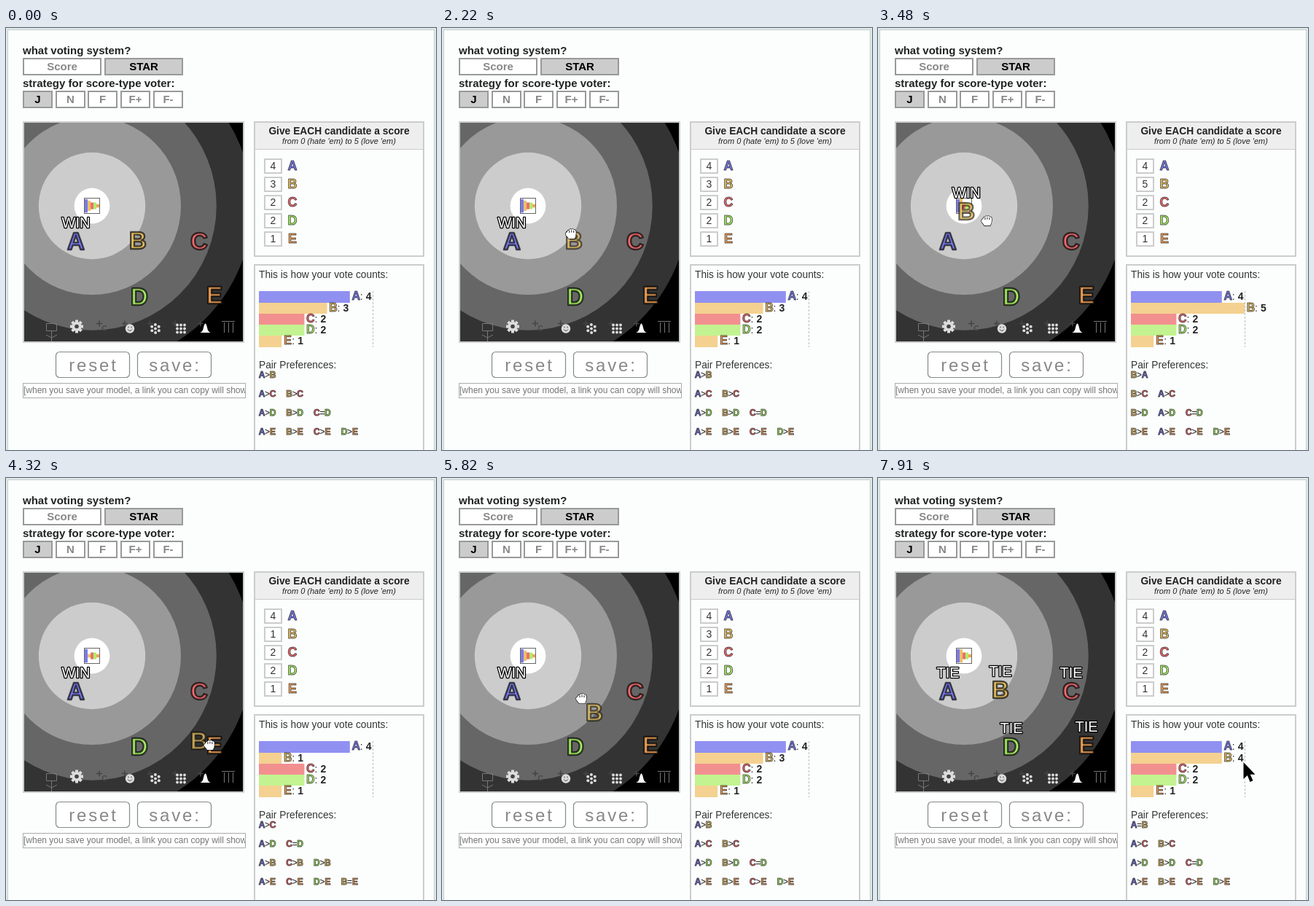
Animation of 590 by 579 pixels, one loop 8 s. Source, as an HTML page with a canvas:

```html
<!DOCTYPE html>
<html lang="en">
<head>
<meta charset="utf-8">
<title>STAR voting sandbox</title>
<style>
html, body { margin: 0; width: 100%; height: 100%; overflow: hidden; background: #e0ebe9; }
canvas { display: block; }
</style>
</head>
<body>
<canvas id="stage" width="590" height="579"></canvas>
<script>
const ctx = document.getElementById('stage').getContext('2d');
const FONT = 'Arial, "Liberation Sans", sans-serif';
const VOTER = { x: 118, y: 244 }, RING = 48.8;
const LOOP = 8000, LAG = 120;
const ENTER = 570, GRAB = 1800, DRAG = 2220, DROP = 6060, RELEASE = 6470;

const candidates = [
  { name: 'A', x: 96, y: 292, color: '#7b7bea', bar: '#9090f1' },
  { name: 'B', x: 181, y: 291, color: '#e8c266', bar: '#f4d190' },
  { name: 'C', x: 265, y: 292, color: '#f06c70', bar: '#f29090' },
  { name: 'D', x: 183, y: 368, color: '#aaf068', bar: '#c2f390' },
  { name: 'E', x: 286, y: 366, color: '#f2a45c', bar: '#f4d190' }
];
const dragged = candidates[1];

// Where the pointer turns or pauses
const path = [
  { t: ENTER, x: 59, y: 542 }, { t: 1110, x: 163, y: 414 }, { t: 1680, x: 183, y: 302 },
  { t: DRAG, x: 177, y: 283 }, { t: 3000, x: 118, y: 246 }, { t: 3360, x: 117, y: 243 },
  { t: 3480, x: 149, y: 265 }, { t: 4320, x: 279, y: 367 }, { t: 4560, x: 303, y: 394 },
  { t: 5100, x: 303, y: 394 }, { t: 5700, x: 205, y: 314 }, { t: DROP, x: 164, y: 282 },
  { t: RELEASE, x: 164, y: 282 }, { t: 6590, x: 298, y: 342 }, { t: 7150, x: 505, y: 384 },
  { t: 7500, x: 491, y: 383 }, { t: 7910, x: 501.5, y: 390 }
];

const clamp = (v, lo, hi) => Math.min(hi, Math.max(lo, v));

function pointerAt(time) {
  const t = clamp(time, ENTER, path.at(-1).t);
  const i = path.findIndex(p => p.t >= t);
  const b = path[i], a = path[i - 1] ?? b;
  const k = a === b ? 0 : (t - a.t) / (b.t - a.t);
  return { x: a.x + (b.x - a.x) * k, y: a.y + (b.y - a.y) * k };
}

const score = c => Math.max(0, 5 - Math.round(Math.hypot(c.x - VOTER.x, c.y - VOTER.y) / RING));

function rect(x, y, w, h, fill) {
  ctx.fillStyle = fill;
  ctx.fillRect(x, y, w, h);
}

function box(x, y, w, h, border, fill, line = 2) {
  rect(x, y, w, h, border);
  rect(x + line, y + line, w - 2 * line, h - 2 * line, fill);
}

function text(str, x, y, style, color = '#333', align = 'left') {
  ctx.font = `${style} ${FONT}`;
  ctx.textAlign = align;
  ctx.fillStyle = color;
  ctx.fillText(str, x, y);
}

function edge(str, x, y, style, color, width) {
  ctx.font = `${style} ${FONT}`;
  ctx.textAlign = 'center';
  ctx.strokeStyle = color;
  ctx.lineWidth = width;
  ctx.strokeText(str, x, y);
}

function letter(c, x, y, size, shade = '#0009', width = 1) {
  const style = `bold ${size}px`;
  text(c.name, x, y, style, c.color, 'center');
  edge(c.name, x, y, style, shade, width);
}

function disc(x, y, r, fill) {
  ctx.fillStyle = fill;
  ctx.beginPath();
  ctx.arc(x, y, r, 0, 2 * Math.PI);
  ctx.fill();
}

function lines(d, color, width = 1) {
  ctx.strokeStyle = color;
  ctx.lineWidth = width;
  ctx.stroke(new Path2D(d));
}

function choice(label, x, y, w, on) {
  box(x, y, w, 24, '#999', on ? '#ccc' : '#fff');
  text(label, x + w / 2, y + 17, 'bold 15px', on ? '#000' : '#888', 'center');
}

function drawControls() {
  rect(0, 0, 590, 579, '#e0ebe9');
  box(2, 2, 586, 590, '#c6cecd', '#fcfefe', 1);
  text('what voting system?', 23, 36, 'bold 15px', '#222');
  choice('Score', 23, 41, 108, false);
  choice('STAR', 135, 41, 108, true);
  text('strategy for score-type voter:', 23, 81, 'bold 15px', '#222');
  ['J', 'N', 'F', 'F+', 'F-'].forEach((s, i) => choice(s, Math.round(23 + 44.7 * i), 86, 41, !i));

  ctx.letterSpacing = '2.8px';
  for (const [label, x] of [['reset', 68], ['save:', 180]]) {
    ctx.beginPath();
    ctx.roundRect(x + .5, 444.5, 101, 35, 5);
    ctx.fillStyle = '#fff';
    ctx.fill();
    ctx.strokeStyle = '#888';
    ctx.lineWidth = 1.2;
    ctx.stroke();
    text(label, x + 52, 471, '24px', '#888', 'center');
  }
  ctx.letterSpacing = '0px';

  box(23, 487, 306, 21, '#aaa', '#fff', 1);
  ctx.save();
  ctx.beginPath();
  ctx.rect(24, 488, 304, 19);
  ctx.clip();
  text('[when you save your model, a link you can copy will show up here]', 24, 501, '12px', '#757575');
  ctx.restore();
}

function drawToolbar() {
  const dim = '#777', light = '#ddd';
  lines('M55.5 405.5h14v10h-14zM62.5 416v14M55 421l7.5 4 7.5-4M296 402.5h18M299.5 404v14M305.5 404v14M311.5 404v14', dim);
  for (let a = 0; a < 2 * Math.PI; a += Math.PI / 4)
    lines(`M97 409.5l${9 * Math.cos(a)} ${9 * Math.sin(a)}`, light, 4);
  disc(97, 409.5, 6.5, light);
  disc(97, 409.5, 2.8, '#444');
  for (let i = 0; i < 5; i++) lines(`M${124 + 34.7 * i} 405.5h8m-4-4v8`, '#444', 1.5);
  text('c', 135, 416, '15px', '#444', 'center');
  disc(170, 412.5, 6.2, light);
  lines('M167 413.5q3 4 6 0M168 409.5v2M172 409.5v2', '#444');
  disc(205, 412.5, 2, light);
  for (let a = .5; a < 6.5; a += Math.PI / 3) disc(205 + 5.5 * Math.cos(a), 412.5 + 5.5 * Math.sin(a), 2, light);
  for (let i = 0; i < 9; i++) disc(235 + 5 * (i % 3), 407.5 + 5 * Math.floor(i / 3), 1.9, light);
  ctx.fillStyle = '#fff';
  ctx.fill(new Path2D('M266 418q4-1 5-7q2.5-11 5 0q1 6 5 7z'));
}

function drawArena(scores, held) {
  box(23, 128, 304, 304, '#ccc', '#000');
  ctx.save();
  ctx.beginPath();
  ctx.rect(25, 130, 300, 300);
  ctx.clip();
  ['#333', '#666', '#999', '#ccc', '#fff'].forEach((c, i) => disc(VOTER.x, VOTER.y, RING * (4.5 - i), c));
  box(107, 233, 22, 22, '#666', '#fff', 1);
  candidates.forEach((c, i) => {
    const h = scores[i] * 4.6;
    rect(108 + 4 * i, VOTER.y - h / 2, 4, h, c.color);
  });
  drawToolbar();

  const best = Math.max(...scores);
  const tie = scores.filter(s => s === best).length > 1;
  const result = tie ? 'TIE' : 'WIN';
  const order = [...candidates].sort((a, b) => (a === dragged) - (b === dragged));
  for (const c of order) {
    ctx.globalAlpha = held && c === dragged ? .82 : 1;
    letter(c, c.x, c.y + 11.5, 33, '#000a', 2.4);
    ctx.globalAlpha = 1;
    if (tie || score(c) === best) {
      edge(result, c.x, c.y - 18.5, '20px', '#000', 2.6);
      text(result, c.x, c.y - 18.5, '20px', '#fff', 'center');
    }
  }
  ctx.restore();
}

function drawBallot(scores) {
  box(340, 128, 234, 186, '#ccc', '#fcfefe');
  rect(342, 130, 230, 36, '#eee');
  rect(342, 166, 230, 1, '#ccc');
  text('Give EACH candidate a score', 457, 146, 'bold 13.8px', '#222', 'center');
  text("from 0 (hate 'em) to 5 (love 'em)", 457, 159, 'italic 11px', '#222', 'center');
  candidates.forEach((c, i) => {
    const y = 179 + 25 * i;
    box(354, y, 25, 21, '#ccc', '#fff');
    text(scores[i], 366.5, y + 15, '14px', '#333', 'center');
    letter(c, 393, y + 16, 18);
  });
}

function drawCount(scores) {
  box(340, 324, 234, 300, '#ccc', '#fcfefe');
  text('This is how your vote counts:', 347, 343, '13.75px');
  ctx.setLineDash([3, 2]);
  lines('M503.5 361v77', '#bbb');
  ctx.setLineDash([]);
  const barTop = i => Math.round(361.3 + 15.28 * i);
  candidates.forEach((c, i) => {
    const y = barTop(i), end = 347 + scores[i] * 31.2;
    rect(347, y, end - 347, barTop(i + 1) - y, c.bar);
    letter(c, end + 8.5, y + 12, 16);
    text(':', end + 14, y + 12, '14px');
    text(scores[i], end + 22, y + 12, 'bold 14px', '#222');
  });

  text('Pair Preferences:', 347, 467, '13.75px');
  const ranked = candidates.map((c, i) => ({ c, s: scores[i] })).sort((a, b) => b.s - a.s);
  ranked.forEach((low, row) => ranked.slice(0, row).forEach((high, col) => {
    const x = 347 + 37.7 * col, y = 454 + 26 * row;
    letter(high.c, x + 4, y, 12);
    text(high.s > low.s ? '>' : '=', x + 11.5, y, '12px', '#111', 'center');
    letter(low.c, x + 19, y, 12);
  }));
}

const ARROW = new Path2D('M0 0V23L5.3 18 9 27 13 25.3 9.3 16.7H16Z');
const FIST = new Path2D('M-5-3q0-3 2.5-2.5q1-2.5 3.2-1q2-1.6 3.3.6q2.8-.6 2.8 2.4v3q0 3-2 6.5h-8q-1.5-2.5-3.5-4.5q-1.5-4 1.7-4.5z');
const FINGER = new Path2D('M-2 1q2-2.5 4 0v7l8 2q3 1 2 5l-2 6h-9l-6-8q-1-3 3-1z');

function drawCursor(t, held) {
  if (t < ENTER) return;
  const { x, y } = pointerAt(t);
  const hand = held ? FIST : y > 444 && y < 480 ? FINGER : null;
  ctx.save();
  ctx.translate(x, y);
  ctx.lineJoin = 'miter';
  ctx.lineWidth = hand ? 1.2 : 2.2;
  ctx.strokeStyle = hand ? '#000' : '#fff';
  ctx.fillStyle = hand ? '#fff' : '#000';
  ctx.stroke(hand ?? ARROW);
  ctx.fill(hand ?? ARROW);
  if (held) lines('M-2.2-5v3M.8-5.5v3M3.8-5v3', '#000', .9);
  ctx.restore();
}

function draw(t) {
  // The dragged letter trails the pointer.
  const grip = pointerAt(clamp(t - LAG, DRAG, DROP));
  dragged.x = grip.x + 4;
  dragged.y = grip.y + 8;
  const scores = candidates.map(score);
  const held = t >= GRAB && t < RELEASE;
  ctx.lineJoin = 'round';
  drawControls();
  drawArena(scores, held);
  drawBallot(scores);
  drawCount(scores);
  drawCursor(t, held);
}

const start = performance.now();
function tick() {
  draw((performance.now() - start) % LOOP);
  requestAnimationFrame(tick);
}
tick();
</script>
</body>
</html>
```
